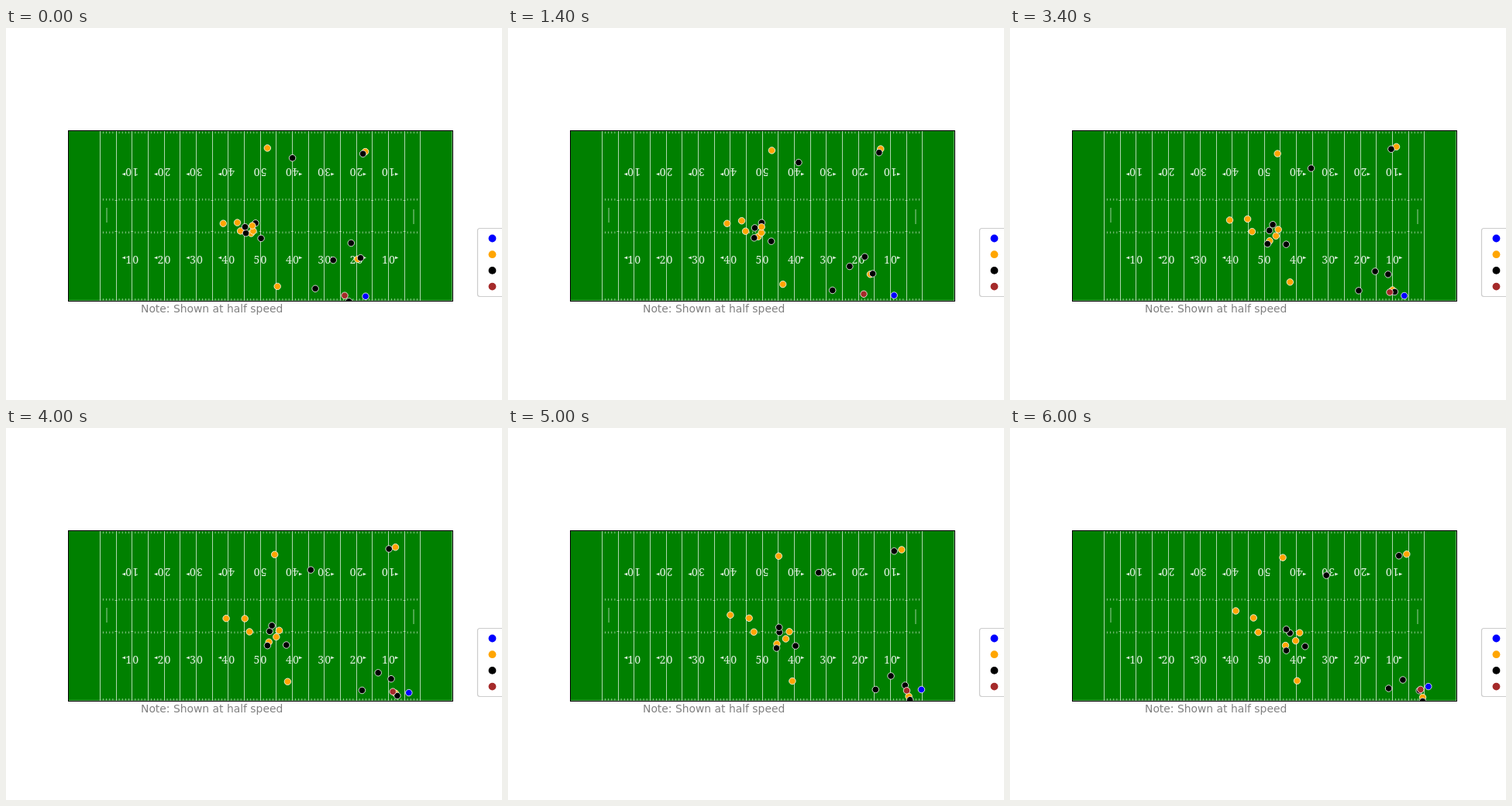
Animation of 640 by 480 pixels, one loop 6.2 s. Source, as an HTML page:

```html
<!DOCTYPE html>
<html lang="en">
<head>
<meta charset="utf-8">
<title>Play tracking</title>
<style>
  html, body { margin: 0; width: 100%; height: 100%; overflow: hidden; background: #fff; }
  svg { display: block; width: 640px; height: 480px; }
  .note { font: 13.89px "DejaVu Sans", sans-serif; fill: #808080; }
  .digit { font: 14px "Noto Serif", serif; text-anchor: middle; }
  .label { fill: #e2f1e2; }
  .line { stroke: #fff; stroke-opacity: .68; fill: none; }
  .player { stroke: #fff; stroke-width: .8; }
</style>
</head>
<body>
<svg viewBox="0 0 640 480">
  <defs><clipPath id="pitch"><rect x="80" y="132" width="497" height="221"/></clipPath></defs>
  <rect x="80.5" y="132.5" width="496" height="220" fill="#008000"/>
  <g id="marks"></g>
  <g id="players" clip-path="url(#pitch)"></g>
  <rect x="80.5" y="132.5" width="496" height="220" fill="none" stroke="#000"/>
  <text class="note" x="174" y="367">Note: Shown at half speed</text>
  <rect x="608.5" y="258.5" width="120" height="88" rx="3" fill="#fff" stroke="#ccc" stroke-width="1.2"/>
  <g id="legend"></g>
</svg>
<script>
const LOOP = 6200, STEP = 200, LAST = LOOP - STEP;
const YARD = 496 / 120, GOAL = 80 + 10 * YARD;
const BLUE = "#00f", ORANGE = "#ffa500", BLACK = "#000", BROWN = "#a52a2a";
const players = [];

function add(parent, tag, attrs, text) {
  const el = document.createElementNS("http://www.w3.org/2000/svg", tag);
  for (const key in attrs) el.setAttribute(key, attrs[key]);
  if (text) el.textContent = text;
  parent.appendChild(el);
  return el;
}
const group = id => document.getElementById(id);
const snap = v => Math.floor(v + .01) + .5;

function drawMarks() {
  const marks = group("marks");
  const line = (d, width) => add(marks, "path", { d, class: "line", "stroke-width": width });
  let lines = "", ticks = "";
  for (let yard = 0; yard <= 100; yard++) {
    const x = GOAL + yard * YARD;
    if (yard % 5 === 0) {
      lines += `M${snap(x)} 133V352`;
      if (yard % 100) ticks += `M${x - 1.5} 222.5h3M${x - 1.5} 262.5h3`;
    } else {
      for (const y of [133.5, 220, 262.5, 349]) ticks += `M${x} ${y}v2.7`;
    }
  }
  line(lines, 1);
  line(ticks, .8);
  line("M130 232V251M526 234V253", .9);
  line("M81 351.7H576M575.5 133V352", .6);

  for (let yard = 10; yard <= 90; yard += 10) {
    const x = GOAL + yard * YARD;
    const tens = Math.min(yard, 100 - yard) / 10;
    const side = Math.sign(yard - 50);
    drawLabel(marks, x, 299, tens, side, 0);
    drawLabel(marks, x, 186, tens, -side, 180);
  }
}

// Two digits straddling a yard line, with an arrow toward the nearer goal
function drawLabel(parent, x, y, tens, side, turn) {
  const g = add(parent, "g", { class: "label", transform: `translate(${x} ${y}) rotate(${turn})` });
  add(g, "text", { class: "digit", x: -4.5, y: 5 }, String(tens));
  add(g, "text", { class: "digit", x: 4.5, y: 5 }, "0");
  if (side) add(g, "path", { d: `M${side * 8.6} -4.4v3.6L${side * 13} -2.6z` });
}

// Smooth curve through evenly timed values, for u from 0 to 1
function curve(v, u) {
  const n = v.length - 1;
  const at = i => i < 0 ? (n > 1 ? 3 * v[0] - 3 * v[1] + v[2] : 2 * v[0] - v[1])
    : i > n ? (n > 1 ? 3 * v[n] - 3 * v[n - 1] + v[n - 2] : 2 * v[n] - v[n - 1])
    : v[i];
  const i = Math.min(Math.floor(u * n), n - 1), s = u * n - i;
  const a = at(i), b = at(i + 1);
  const m = (b - at(i - 1)) / 2, k = (at(i + 2) - a) / 2;
  return a + s * (m + s * (3 * (b - a) - 2 * m - k + s * (m + k - 2 * (b - a))));
}

function player(fill, ...points) {
  const el = add(group("players"), "circle", { class: "player", r: 4.25, fill });
  players.push({ el, xs: points.map(p => p[0]), ys: points.map(p => p[1]) });
}

function drawPlayers() {
  player(ORANGE, [337.3, 154.9], [344.2, 161.3], [352, 167.2]);
  player(ORANGE, [280.3, 252.2], [283.4, 251.5], [284.1, 245.7], [291.3, 236]);
  player(ORANGE, [298.5, 251.1], [305.5, 246.8], [314.2, 245]);
  player(ORANGE, [302.6, 261.9], [311.2, 262.6], [320.4, 263.6]);
  player(ORANGE, [316.3, 265], [332.3, 273.7], [355.5, 280.6]);
  player(ORANGE, [319, 262], [331.2, 265.3], [348.8, 269.6], [368.6, 274.6]);
  player(ORANGE, [350.2, 333.4], [360, 328.3], [370.5, 326.2]);
  player(ORANGE, [453.8, 298.3], [474.4, 324.8], [502.3, 342.1], [532.5, 347.5]);
  player(ORANGE, [463.6, 159.6], [487, 155], [502.5, 153.8], [511.8, 162.8]);

  player(BLACK, [369.6, 167.7], [378.2, 175.9], [393.3, 183.1], [408.2, 190.1]);
  player(BLACK, [460.6, 162.3], [484.5, 159.8], [494.2, 156], [501.8, 164.8]);
  player(BLACK, [309.5, 264.7], [329.1, 277.1], [356.5, 287.1]);
  player(BLACK, [329.1, 271.4], [352.9, 278.5], [380.8, 281.8]);
  player(BLACK, [445.3, 277.5], [467.8, 302.3], [497, 323.7], [528.2, 338.8]);
  player(BLACK, [422.2, 299.6], [449.4, 310.2], [480.2, 315.8], [506.9, 325]);
  player(BLACK, [399.1, 336.3], [427.6, 338.9], [459.4, 338.5], [488.6, 336]);
  player(BLACK, [457.5, 296.7], [477.4, 324.6], [504.9, 345.4], [532.5, 352.6]);
  player(BLACK, [442.5, 352.8], [525, 395]);
  player(BLACK, [308.5, 256.7], [323.1, 258.7], [340.2, 262.3], [361.2, 264.6]);
  player(BLACK, [322, 251.8], [330.3, 251.5], [343.1, 255], [356.5, 259.8]);

  player(ORANGE, [317.8, 255.1], [332.1, 257.5], [352.5, 261.2], [373.7, 264.2]);
  player(BROWN, [437, 345.2], [468.4, 342.5], [499.2, 340.2], [529.8, 337.4]);
  player(BLUE, [464, 346.2], [490.5, 344.5], [505.5, 346.3], [503.5, 347.4],
    [519.8, 341.6], [533.4, 337.5], [539.8, 333.6]);
}

function drawLegend() {
  [BLUE, ORANGE, BLACK, BROWN].forEach((fill, i) =>
    add(group("legend"), "circle", { cx: 627.5, cy: 271.5 + i * 20.7, r: 4.9, fill }));
}

function pose(time) {
  for (const { el, xs, ys } of players) {
    el.setAttribute("cx", curve(xs, time / LAST).toFixed(2));
    el.setAttribute("cy", curve(ys, time / LAST).toFixed(2));
  }
}

drawMarks();
drawPlayers();
drawLegend();
pose(0);

const start = performance.now();
function tick() {
  const time = (performance.now() - start) % LOOP;
  pose(Math.floor(time / STEP) * STEP);
  requestAnimationFrame(tick);
}
requestAnimationFrame(tick);
</script>
</body>
</html>
```
